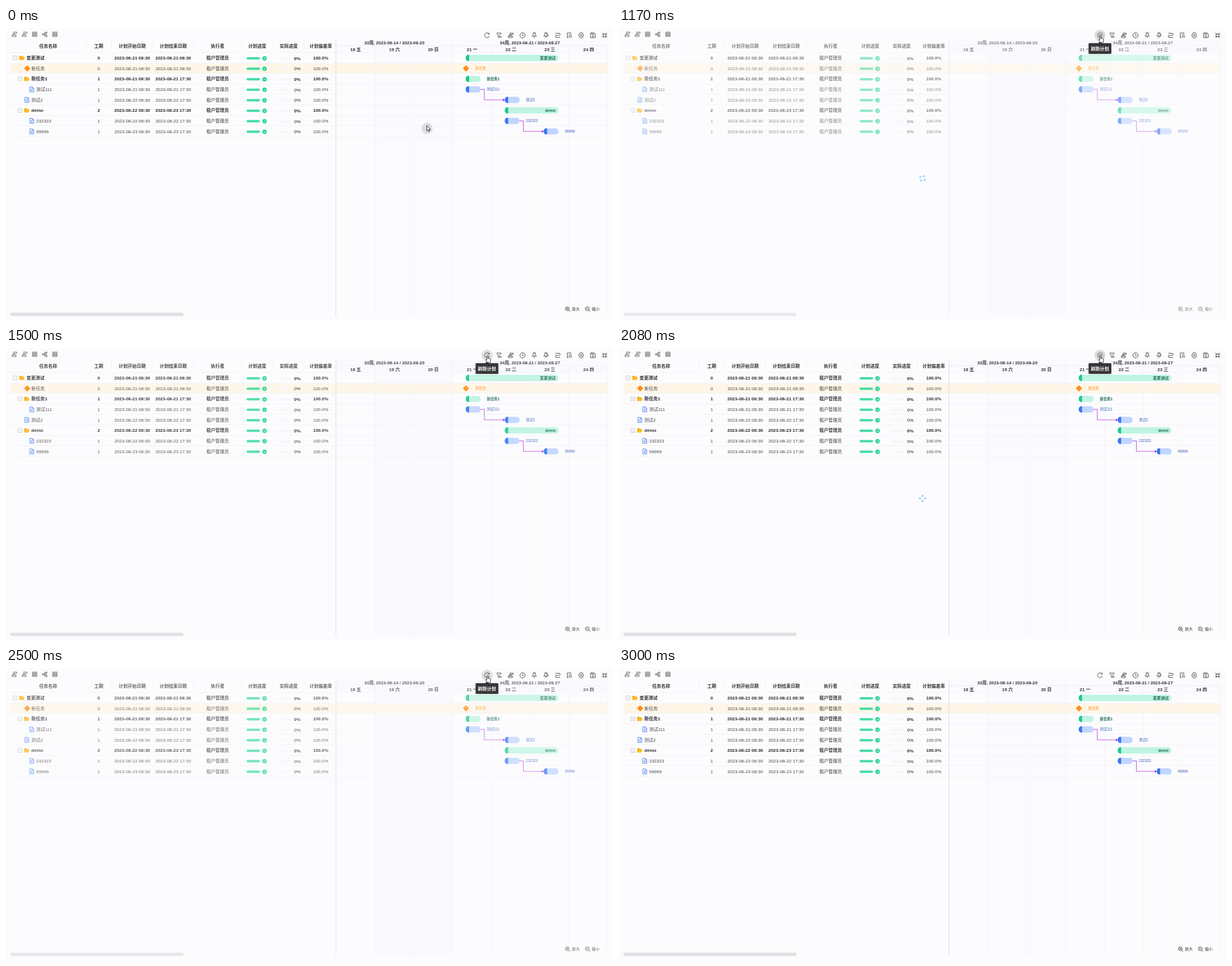
Write an HTML page with a canvas that moves like this. It is 1080x519 px and loops after 3760 ms.

```html
<!DOCTYPE html>
<html lang="zh">
<head>
<meta charset="utf-8">
<title>计划</title>
<style>
html, body { margin: 0; width: 100%; height: 100%; overflow: hidden; background: #fcfcfe; }
canvas { display: block; width: 100vw; height: 100vh; }
</style>
</head>
<body>
<canvas id="stage" width="1080" height="519"></canvas>
<script>
const W = 1080, H = 519, LOOP = 3760;
const FONT = '"Liberation Sans", "Noto Sans CJK SC", "Noto Sans CJK", sans-serif';
const stage = document.getElementById('stage').getContext('2d');
const sheet = document.createElement('canvas');
sheet.width = W;
sheet.height = H;
let g = sheet.getContext('2d');

// ---------- drawing helpers ----------
function text(str, x, y, { size = 8, bold = false, color = '#333335', align = 'left' } = {}) {
  g.font = `${bold ? 'bold ' : ''}${size}px ${FONT}`;
  g.textAlign = align;
  g.fillStyle = color;
  g.fillText(str, x, y + size * 0.36);
}
function rect(x, y, w, h, color) {
  g.fillStyle = color;
  g.fillRect(x, y, w, h);
}
function pill(x, y, w, h, r, color) {
  g.beginPath();
  g.roundRect(x, y, w, h, r);
  g.fillStyle = color;
  g.fill();
}
function disc(x, y, r, color) {
  g.beginPath();
  g.arc(x, y, r, 0, Math.PI * 2);
  g.fillStyle = color;
  g.fill();
}
function shape(path, x, y, { fill, stroke, width = 1 } = {}) {
  const p = new Path2D(path);
  g.save();
  g.translate(x, y);
  g.lineJoin = 'round';
  if (fill) { g.fillStyle = fill; g.fill(p); }
  if (stroke) { g.strokeStyle = stroke; g.lineWidth = width; g.stroke(p); }
  g.restore();
}
const ring = (r, x = 0, y = 0) =>
  `M${x + r} ${y}A${r} ${r} 0 1 1 ${x - r} ${y}A${r} ${r} 0 1 1 ${x + r} ${y}`;

// ---------- icons ----------
const PIN = 'M-2.5-4.3H2.5M-1.6-4.3V-1L-4 1.3H4L1.6-1V-4.3M0 1.3V4.8';
const STACK = 'M-4-4H4V-2H-4ZM-4-1H4V1H-4ZM-4 2H4V4H-4Z';
const STEPS = 'M-1.5-4H4.3V-1.5H-1.5ZM-4.3 1.5H3V4H-4.3ZM-3 1.5V-.2H1.5';
const BRANCH = 'M-4.3-1H-1.5V1H-4.3ZM1-4H4V-2H1ZM1 2H4V4H1ZM-1.5 0H4M1-3H-.3V3H1';
const REFRESH = 'M3.7-2.3A4.3 4.3 0 1 0 4.2 1M4.1-4.6V-2.1H1.5';
const DIAMOND = 'M0-5.6L5.6 0L0 5.6L-5.6 0Z';
const ZOOM = ring(3.4, -.8, -.8) + 'M1.7 1.7L4.4 4.4M-2.5-.8H.9';
const leftTools = [STEPS, STEPS, STACK, BRANCH, STACK];
const rightTools = [
  REFRESH,
  'M-4.3-4H4L.9-.2V4.2L-1.4 2.9V-.2ZM2.2 1.8L4.2 3.8M4.2 1.8L2.2 3.8',
  STEPS,
  ring(4.6) + 'M0-2.6V.3H2.4',
  PIN,
  PIN + 'M2.2-2.5L4.3 0',
  'M-4.3-3.6H2.6A1.8 1.8 0 0 1 2.6 0H-2.6A1.8 1.8 0 0 0-2.6 3.6H4.3',
  'M-1 4.2H-3.8V-4.2H2.6V-2.2' + ring(2.1, 1.4, 1) + 'M2.9 2.5L4.4 4.2',
  'M-2-4.4H2L4.4 0L2 4.4H-2L-4.4 0Z' + ring(1.6),
  'M-4.2-4.2H2.4L4.2-2.4V4.2H-4.2ZM-2-4.2V-2H1.6V-4.2' + ring(1.3, 0, 1.4),
  'M-4.3-4.3L-1.2-1.2V-4M-1.2-1.2H-4M4.3-4.3L1.2-1.2V-4M1.2-1.2H4M-4.3 4.3L-1.2 1.2V4M-1.2 1.2H-4M4.3 4.3L1.2 1.2V4M1.2 1.2H4'
];
const toolX = i => (i ? 856.4 + 20.87 * i : 855.8);

// ---------- content ----------
const GREEN = { body: '#bff4e1', done: '#1fc88b', label: '#17694f' };
const BLUE = { body: '#c1d6ff', done: '#3a76f5', label: '#3d5cb8' };
const tasks = [
  { name: '变更测试', kind: 'group', level: 0, days: 0, from: '21 08:30', to: '21 08:30', x: 818, w: 165, inside: true },
  { name: '新任务', kind: 'mark', level: 1, days: 0, from: '21 08:30', to: '21 08:30', x: 818 },
  { name: '新任务1', kind: 'group', level: 1, days: 1, from: '21 08:30', to: '21 17:30', x: 818, w: 26.5 },
  { name: '测试111', kind: 'leaf', level: 2, days: 1, from: '21 08:30', to: '21 17:30', x: 818, w: 26.5 },
  { name: '测试2', kind: 'leaf', level: 1, days: 1, from: '22 08:30', to: '22 17:30', x: 887.5, w: 26.5 },
  { name: 'demo', kind: 'group', level: 1, days: 2, from: '22 08:30', to: '23 17:30', x: 887.5, w: 95.5, inside: true },
  { name: '232323', kind: 'leaf', level: 2, days: 1, from: '22 08:30', to: '22 17:30', x: 887.5, w: 26.5 },
  { name: '99999', kind: 'leaf', level: 2, days: 1, from: '23 08:30', to: '23 17:30', x: 956.8, w: 26.5 }
];
const PITCH = 18.65;
const rowY = i => 53.2 + PITCH * i;
const columns = [['任务名称', 75], ['工期', 165], ['计划开始日期', 224.5], ['计划结束日期', 297.5],
  ['执行者', 376.5], ['计划进度', 447], ['实际进度', 503], ['计划偏差率', 560]];

function drawGrid() {
  rect(657, 45, 137, 467, '#fafaff');
  rect(588, 21, 483, 23, '#fafaff');
  rect(8, 63, 1063, 18, '#fff6e7');
  for (let i = 0; i <= tasks.length; i++) rect(8, Math.round(rowY(i) - PITCH / 2) - 1, 1063, 1, '#f3f3f7');
  rect(588, 31, 483, 1, '#eeeef4');
  for (let i = 1; i < 8; i++) rect(Math.round(587.4 + 69.1 * i) - 1, i === 3 ? 21 : 32, 1, i === 3 ? 491 : 480, '#f2f3f8');
  for (const x of [142, 187, 260, 333, 418, 474, 530]) rect(x, 23, 1, 17, '#f0f0f3');
  rect(586.5, 21, 1, 491, '#dcdce0');
  for (const [label, x] of columns) text(label, x, 31.8, { bold: true, align: 'center' });
  text('33周, 2023-08-14 / 2023-08-20', 691, 26.3, { bold: true, size: 7.8, align: 'center' });
  text('34周, 2023-08-21 / 2023-08-27', 932, 26.3, { bold: true, size: 7.8, align: 'center' });
  [...'五六日一二三四'].forEach((day, i) =>
    text(`${18 + i} ${day}`, 622 + 69.1 * i, 38.2, { bold: true, align: 'center' }));
}

function drawName(task, y) {
  const x = 36.5 + 8.6 * task.level;
  const iconX = x - 8.2;
  if (task.kind === 'group') {
    shape('M-3.5-3.5H3.5V3.5H-3.5ZM-1.8 0H1.8', x - 20.5, y, { stroke: '#bdbdc1', width: .8 });
    shape('M-4.5 3.7V-3.7H-1L.2-2.4H3.4V-1', iconX, y, { fill: '#f7a600' });
    shape('M-4.5 3.7L-2.6-1H5L3.4 3.7Z', iconX, y, { fill: '#ffbd20' });
  } else if (task.kind === 'mark') {
    shape(DIAMOND, iconX + .8, y, { fill: '#ff8f1c' });
  } else {
    shape('M-3.6-4.5H1.2L3.6-2V4.5H-3.6ZM1.2-4.5V-2H3.6M-1.6 0H1.6M-1.6 2H1.6', iconX + .3, y,
      { fill: '#e4edff', stroke: '#5485ea', width: .9 });
  }
  const bold = task.kind === 'group';
  text(task.name, x, y, { bold, color: bold ? '#2c2c2e' : '#48484c' });
}

function drawCells(task, y) {
  const bold = task.kind === 'group';
  const style = { bold, color: bold ? '#2c2c2e' : '#48484c', align: 'center' };
  drawName(task, y);
  text(task.days, 165, y, style);
  text('2023-08-' + task.from, 224.5, y, style);
  text('2023-08-' + task.to, 297.5, y, style);
  text('租户管理员', 376.5, y, { ...style, color: '#3a3a3c' });
  pill(428, y - 1.5, 24, 4.2, 2.1, '#45dca6');
  disc(460, y + .7, 4, '#2fd69a');
  shape('M-1.7 0L-.4 1.3L1.8-1.1', 460, y + .7, { stroke: '#fff', width: .9 });
  pill(484.5, y - 1, 23, 4, 2, '#f7f7fa');
  text('0%', 524, y + .7, { bold, color: '#222', align: 'right' });
  text('100.0%', 560, y, style);
}

function drawBar(task, y) {
  if (task.kind === 'mark') {
    shape(DIAMOND, 818.4, y, { fill: '#ff8f1c' });
    text(task.name, 835, y, { size: 6.4, color: '#ff8f1c' });
    return;
  }
  const bold = task.kind === 'group';
  const tone = bold ? GREEN : BLUE;
  pill(task.x, y - 5.6, task.w, 11.2, 5.4, tone.body);
  pill(task.x, y - 5.6, 6, 11.2, [5.4, 1.5, 1.5, 5.4], tone.done);
  if (task.inside) text(task.name, 978, y, { size: 7, bold, color: tone.label, align: 'right' });
  else text(task.name, task.x + task.w + 11, y, { size: 6.4, bold, color: tone.label });
}

function drawLink(a, b) {
  const x = tasks[a].x + tasks[a].w, y = rowY(a), endX = tasks[b].x, endY = rowY(b);
  shape(`M${x} ${y}H${x + 6.5}V${endY}H${endX - 2}`, 0, 0, { stroke: '#c455e6', width: 1.1 });
  shape('M0 0L-4-2.6V2.6Z', endX + .5, endY, { fill: '#b53be0' });
}

function drawZoom() {
  for (const [x, icon, label] of [[999.5, ZOOM + 'M-.8-2.5V.9', '放大'], [1035, ZOOM, '缩小']]) {
    shape(icon, x, 499.8, { stroke: '#333', width: .9 });
    text(label, x + 7.3, 499.6, { size: 7 });
  }
}

function drawSheet() {
  drawGrid();
  tasks.forEach((task, i) => drawCells(task, rowY(i)));
  drawLink(3, 4);
  drawLink(6, 7);
  tasks.forEach((task, i) => drawBar(task, rowY(i)));
  pill(7.5, 506, 308.5, 6, 3, '#e1e1e3');
  drawZoom();
}

// ---------- motion ----------
const clamp = v => Math.min(1, Math.max(0, v));
const smooth = v => { v = clamp(v); return v * v * (3 - 2 * v); };
const easeOut = v => 1 - (1 - clamp(v)) ** 2;
const mix = (a, b, v) => a + (b - a) * v;
const loads = [{ press: 920, start: 1050, end: 1330 }, { press: 2000, start: 2080, end: 2420 }];

function stepTime(t) {
  const k = Math.floor((t + 3.4) * 12 / 1000);
  return Math.min(3000, Math.round(k * 100 / 12) * 10);
}
function sheetAlpha(t) {
  return loads.reduce((a, { start, end }) =>
    a - .5 * (easeOut((t - start) / 220) - easeOut((t - end) / 300)), 1);
}
function pointer(t) {
  const go = smooth((t + 20) / 600), back = smooth((t - 580) / 170);
  const from = smooth(20 / 600), way = (go - from) / (1 - from);
  return { x: mix(749, 870, way) - 14 * back, y: mix(178.5, 10, way) + 3 * back };
}

function drawSpinner(age) {
  for (let i = 0; i < 4; i++) {
    const a = age / 1200 * Math.PI * 2 + i * Math.PI / 2;
    disc(540 + Math.sin(a) * 4.6, 267.3 - Math.cos(a) * 4.6, 2, '#a8d5fd');
  }
}

function drawTooltip(alpha) {
  g.save();
  g.globalAlpha = alpha;
  g.shadowColor = 'rgba(0,0,0,.15)';
  g.shadowBlur = 5;
  pill(835.5, 27, 40.5, 19, 1.5, '#37373a');
  g.shadowColor = 'transparent';
  shape('M-3.5 0L0-3.5L3.5 0Z', 855.8, 27.2, { fill: '#37373a' });
  text('刷新计划', 855.8, 36.7, { bold: true, color: '#fff', align: 'center' });
  g.restore();
}

function drawPointer({ x, y }) {
  if (y > 24) {
    shape('M0 0V9.4L2.1 7.4L3.7 10.8L5.2 10.1L3.7 6.9H6.6Z', x - .3, y - 5,
      { fill: '#fff', stroke: '#222', width: 1 });
  } else {
    shape('M-1.2 6.5V.8A1 1 0 0 1 .8 .8V4.6L4.2 5.4Q5.6 5.8 5.4 7.3L4.6 12.2H-.2L-3.6 8Q-3.4 6.6-2.2 7.2L-1.2 8Z',
      x + .8, y + .6, { fill: '#fff', stroke: '#222', width: .9 });
  }
}

function render(t) {
  rect(0, 0, W, H, '#fcfcfe');
  g.globalAlpha = sheetAlpha(t);
  g.drawImage(sheet, 0, 0);
  g.globalAlpha = 1;

  const cursor = pointer(t);
  const load = loads.find(l => t >= l.press && t < l.end);
  const cursorVisible = t < 2920;
  if (cursorVisible) disc(cursor.x, cursor.y, 10, '#dededf');

  leftTools.forEach((icon, i) => shape(icon, 15 + 18 * i, 11.2, { stroke: '#555', width: .8 }));
  rightTools.forEach((icon, i) => shape(icon, toolX(i), 13, { stroke: '#383838', width: .9 }));

  if (load) {
    disc(856, 13, 6, '#b4b4b6');
    if (t >= load.start) drawSpinner(t - load.start);
  }
  if (t >= 840 && t < 3000) drawTooltip(t < 920 ? .6 : 1);
  if (cursorVisible) drawPointer(cursor);
}

drawSheet();
g = stage;
const origin = performance.now();
function tick() {
  render(stepTime((performance.now() - origin) % LOOP));
  requestAnimationFrame(tick);
}
tick();
</script>
</body>
</html>
```
